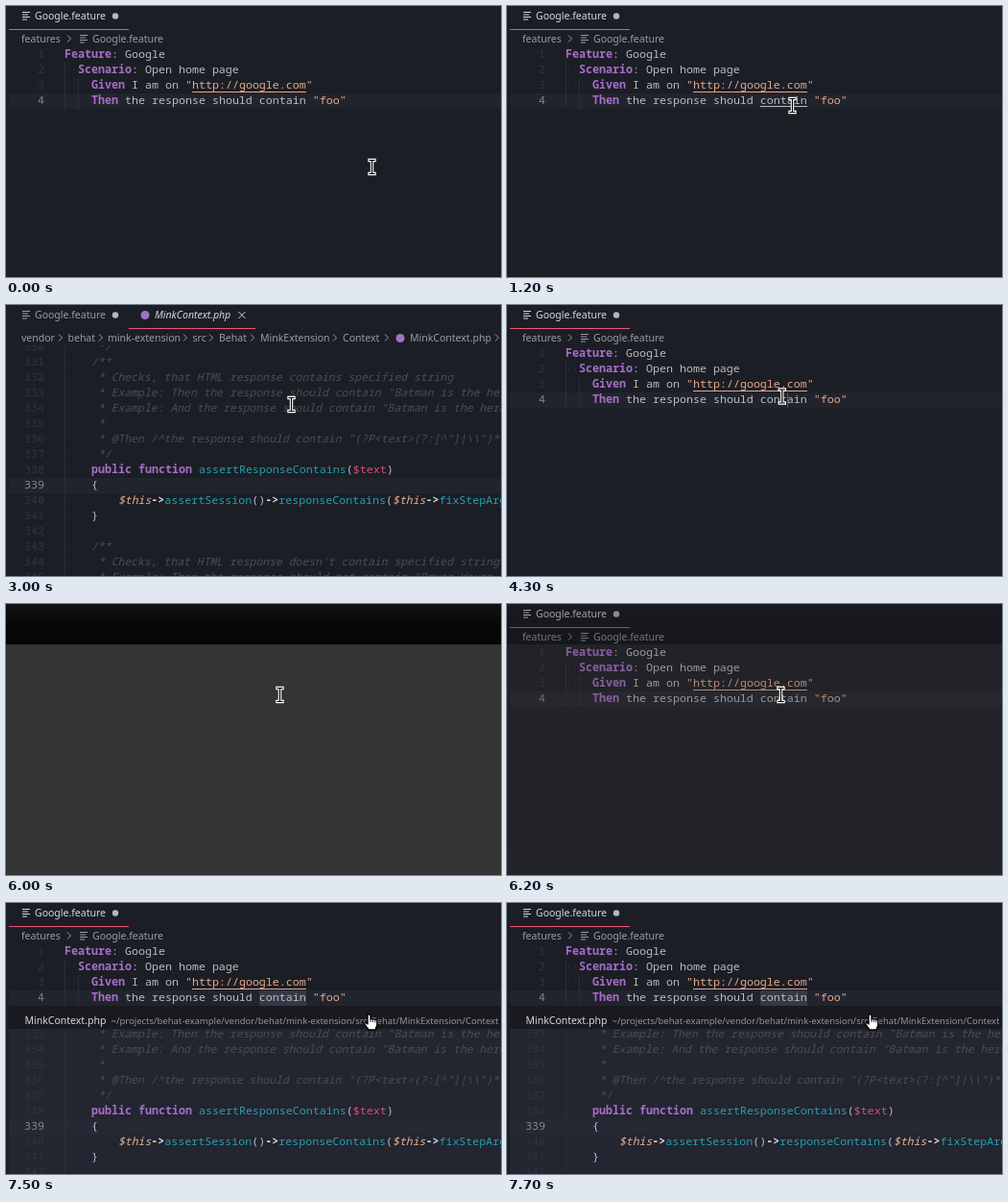
Animation, 516 px wide and 282 px high, one loop 8000 ms. Source, as an HTML page:

```html
<!DOCTYPE html>
<html lang="en">
<head>
<meta charset="utf-8">
<title>Go to definition and peek</title>
<style>
html, body { margin: 0; width: 100%; height: 100%; overflow: hidden; background: #1c1e26; }
svg { display: block; width: 100vw; height: 100vh; }
text { white-space: pre; }
.ui { font: 10.5px "Noto Sans", "Open Sans", sans-serif; }
.small { font-size: 9.48px; }
.italic { font-style: italic; }
.code { font: 11.667px "Noto Sans Mono", "DejaVu Sans Mono", monospace; fill: #bbbcc0; }
.key { fill: #a86ec8; font-weight: bold; }
.str { fill: #e4a88a; }
.fn { fill: #24a1ad; }
.var { fill: #d45070; }
.op { fill: #d5d8da; font-weight: bold; }
.this, .note { font-style: italic; font-size: 11.43px; }
.this { fill: #e5b08c; }
.note { fill: #4c4d53; }
.brace { fill: #a9c0dd; }
.num { fill: #32343d; }
.on { fill: #85878c; }
.space { fill: #30323b; }
</style>
</head>
<body>
<svg id="stage" viewBox="0 0 516 282" preserveAspectRatio="none"></svg>
<script>
const BG = '#1c1e26', RED = '#e95678', CARET = '#e81818', PHP = '#a074c4', BRIGHT = '#d5d8da', DIM = '#9a9ca1';
const LEFT = 61, CHAR = 7, ROW = 16, LOOP = 8000;
const stage = document.getElementById('stage');

function el(parent, tag, attrs = {}, text) {
  const node = document.createElementNS('http://www.w3.org/2000/svg', tag);
  for (const key in attrs) node.setAttribute(key, attrs[key]);
  if (text !== undefined) node.textContent = text;
  parent.appendChild(node);
  return node;
}
const group = (parent, attrs) => el(parent, 'g', attrs);
const rect = (parent, x, y, width, height, fill) => el(parent, 'rect', { x, y, width, height, fill });
const label = (parent, x, y, text, fill, cls = '') =>
  el(parent, 'text', { x, y, fill, class: 'ui ' + cls }, text);
const stroke = (parent, d, color, width = 1) =>
  el(parent, 'path', { d, stroke: color, 'stroke-width': width, fill: 'none' });
const dot = (parent, cx, cy, r, fill) => el(parent, 'circle', { cx, cy, r, fill });

function listIcon(parent, x, y, color) {
  stroke(parent, `M${x} ${y - 3.5}h8m-8 2.5h6m-6 2.5h8m-8 2.5h5`, color, 1.2);
}
function chevron(parent, x) {
  stroke(parent, `M${x - 2} 30.5l3.5 3.5l-3.5 3.5`, DIM);
}

// A line is [indent, text, class, text, class, ...].
function codeLine(parent, y, number, line, active) {
  const digits = String(number);
  el(parent, 'text', { x: 40 - digits.length * CHAR, y, class: 'code ' + (active ? 'on' : 'num') }, digits);
  const [indent, ...parts] = line;
  if (indent) el(parent, 'text', { x: LEFT, y, class: 'code space' }, '·'.repeat(indent));
  const text = el(parent, 'text', { x: LEFT + indent * CHAR, y, class: 'code' });
  for (let i = 0; i < parts.length; i += 2) el(text, 'tspan', { class: parts[i + 1] }, parts[i]);
}
function guide(parent, x, top, height) {
  rect(parent, x, top, 1, height, '#2b2d37');
}

const feature = [
  [0, 'Feature', 'key', ': Google', ''],
  [2, 'Scenario', 'key', ': Open home page', ''],
  [4, 'Given', 'key', ' I am on ', '', '"http://google.com"', 'str'],
  [4, 'Then', 'key', ' the response should contain ', '', '"foo"', 'str']
];
const note = text => [5, text, 'note'];
const php = [
  note('*/'),
  [4, '/**', 'note'],
  note('* Checks, that HTML response contains specified string'),
  note('* Example: Then the response should contain "Batman is the hero Gotham deserves."'),
  note('* Example: And the response should contain "Batman is the hero Gotham deserves."'),
  note('*'),
  note('* @Then /^the response should contain "(?P<text>(?:[^"]|\\\\")*)"$/'),
  note('*/'),
  [4, 'public function', 'key', ' ', '', 'assertResponseContains', 'fn', '(', '', '$text', 'var', ')', ''],
  [4, '{', 'brace'],
  [8, '$this', 'this', '->', 'op', 'assertSession', 'fn', '()', '', '->', 'op', 'responseContains', 'fn', '(', '',
    '$this', 'this', '->', 'op', 'fixStepArgument', 'fn', '(', '', '$text', 'var', '));', ''],
  [4, '}', 'brace'],
  [0],
  [4, '/**', 'note'],
  note('* Checks, that HTML response doesn\'t contain specified string'),
  note('* Example: Then the response should not contain "Bruce Wayne is Batman"')
];

// Row 330 starts at the given top.
function phpCode(parent, top, highlight) {
  rect(parent, 3, top + 9 * ROW, 513, ROW, highlight);
  guide(parent, LEFT, top, php.length * ROW);
  php.forEach((line, i) => codeLine(parent, top + i * ROW + 11, 330 + i, line, i === 9));
}
function clip(id, y) {
  const path = el(stage, 'clipPath', { id });
  rect(path, 0, y, 516, 282 - y, '#000');
  return `url(#${id})`;
}
function firstTab(parent, color) {
  listIcon(parent, 17, 10, color);
  label(parent, 30, 14, 'Google.feature', color);
  dot(parent, 114, 10.5, 3.2, '#b4b6b9');
}

rect(stage, 0, 0, 516, 282, BG);

// Feature file
const home = group(stage);
firstTab(home, BRIGHT);
rect(home, 3, 24, 125, 1, RED);
label(home, 16, 38, 'features', DIM);
chevron(home, 66);
listIcon(home, 77, 34, DIM);
label(home, 90, 38, 'Google.feature', DIM);
rect(home, 3, 91, 513, ROW, '#22242d');
guide(home, LEFT, 59, 48);
guide(home, LEFT + 2 * CHAR, 75, 32);
const mark = rect(home, 264, 91, 49, ROW, '#353845');
feature.forEach((line, i) => codeLine(home, 54 + i * ROW, i + 1, line, i === 3));
rect(home, 194, 89, 119, 1, '#e4a88a');
const link = rect(home, 264, 104, 49, 1, '#bbbcc0');
const homeCaret = rect(home, 292, 91, 1, ROW, CARET);

// Peek panel
const peek = group(home);
rect(peek, 3, 107, 513, 175, '#232530');
const peekCode = group(peek, { 'clip-path': clip('peekArea', 131) });
phpCode(peekCode, 81, '#262833');
rect(peek, 3, 107, 513, 24, '#181a20');
label(peek, 19.5, 126, 'MinkContext.php', BRIGHT);
label(peek, 109.5, 126,
  '~/projects/behat-example/vendor/behat/mink-extension/src/Behat/MinkExtension/Context', '#94969b', 'small');

// Definition file
const definition = group(stage);
firstTab(definition, DIM);
dot(definition, 145, 10.5, 4.5, PHP);
label(definition, 155, 14, 'MinkContext.php', BRIGHT, 'italic');
stroke(definition, 'M242.5 7l7 7m0-7l-7 7', BRIGHT);
rect(definition, 128, 24, 132, 1, RED);
[[16, 'vendor', 57], [64.5, 'behat', 99], [106, 'mink-extension', 187], [194.5, 'src', 214], [222, 'Behat', 257],
  [265, 'MinkExtension', 343], [351, 'Context', 397], [421, 'MinkContext.php', 512]
].forEach(([x, text, arrow]) => {
  label(definition, x, 38, text, DIM);
  chevron(definition, arrow);
});
dot(definition, 411, 34.5, 4.5, PHP);
phpCode(group(definition, { 'clip-path': clip('codeArea', 42) }), 36, '#22242d');
const phpCaret = rect(definition, LEFT, 180, 1, ROW, CARET);

// Grey flash
const flash = group(stage);
const shade = el(flash, 'linearGradient', { id: 'shade', x1: 0, y1: 0, x2: 0, y2: 1 });
el(shade, 'stop', { offset: 0, 'stop-color': '#131313' });
el(shade, 'stop', { offset: 0.6, 'stop-color': '#060606' });
rect(flash, 0, 0, 516, 282, '#343434');
rect(flash, 0, 0, 516, 42, 'url(#shade)');

// Pointers
const pointer = group(stage);
const beam = group(pointer, { 'stroke-linecap': 'square' });
const beamPath = 'M-2.5-7H2.5M0-7V7M-2.5 7H2.5';
stroke(beam, beamPath, '#fff', 3.4);
stroke(beam, beamPath, '#000', 1.2);
const hand = group(pointer);
el(hand, 'path', {
  d: 'M-3-6.5q1.5-1.5 3 0V-2q1.3-1 2.4 0q1.3-.8 2.3.3q1.7-.4 2.1 1.2V4L5 9H-2L-6 3.5q-1-2 1-2L-3 3z',
  fill: '#fff', stroke: '#000', 'stroke-width': 1.3, 'stroke-linejoin': 'round'
});
stroke(hand, 'M0-2v3M2.4-2v3M4.7-1.5v3', '#000', 0.8);

const path = [
  [0, 381.5, 167.5], [300, 381.5, 167.5], [1200, 297.5, 103.5], [3100, 297.5, 103.5], [4000, 292, 97],
  [4100, 292, 97], [4300, 286.8, 95], [4700, 285.5, 94.5], [6400, 285.5, 94.5], [6600, 379.5, 119.5],
  [LOOP, 379.5, 119.5]
];
// Caret fades: [start, end, opacity reached]
const phpFades = [[1700, 2000, 0], [2200, 2500, 1], [2700, 3000, 0]];
const homeFades = [[4400, 4700, 0], [4900, 5200, 1], [5400, 5700, 0], [6400, 6500, 1], [6800, 7200, 0]];

const mix = (a, b, k) => a + (b - a) * k;
const clamp = k => Math.max(0, Math.min(1, k));
function pointerAt(t) {
  const i = path.findIndex(p => t < p[0]);
  const [t0, x0, y0] = path[i - 1], [t1, x1, y1] = path[i];
  const k = (t - t0) / (t1 - t0), ease = k * k * (3 - 2 * k);
  return [mix(x0, x1, ease), mix(y0, y1, ease)];
}
const fadeAt = (fades, t) =>
  fades.reduce((alpha, [from, to, goal]) => mix(alpha, goal, clamp((t - from) / (to - from))), 1);
const show = (node, on) => node.setAttribute('visibility', on ? 'inherit' : 'hidden');
const alpha = (node, value) => node.setAttribute('opacity', value);

function draw(ms) {
  const t = Math.floor(ms % LOOP / 100) * 100;
  const opened = t >= 1400 && t < 3200;
  const peeking = t >= 7400;
  show(home, !opened);
  show(definition, opened);
  show(link, t >= 1100 && t < 1400);
  show(mark, t >= 6500);
  show(peek, peeking);
  show(beam, !peeking);
  show(hand, peeking);
  alpha(phpCaret, fadeAt(phpFades, t));
  alpha(homeCaret, t < 4200 ? 0 : fadeAt(homeFades, t));
  alpha(flash, t < 6000 ? 0 : t < 6100 ? 1 : clamp((6300 - t) / 400));
  const [x, y] = peeking ? [380, 123] : pointerAt(t);
  pointer.setAttribute('transform', `translate(${x} ${y})`);
}

const start = performance.now();
function tick() {
  draw(performance.now() - start);
  requestAnimationFrame(tick);
}
draw(0);
requestAnimationFrame(tick);
</script>
</body>
</html>
```
